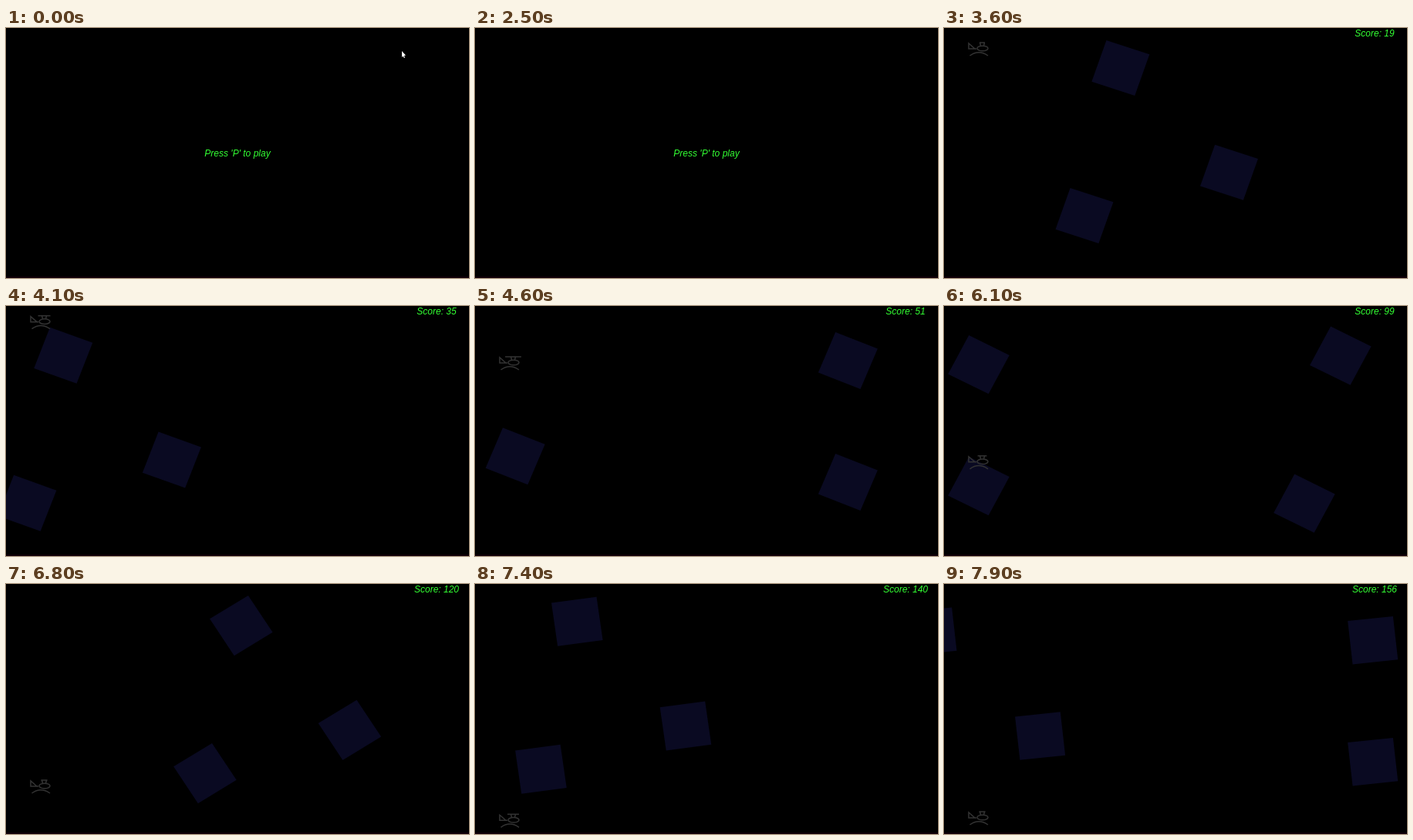
Write an HTML page with a canvas that moves like this. It is 600x325 px and loops after 8000 ms.

```html
<!DOCTYPE html>
<html lang="en">
<head>
<meta charset="utf-8">
<title>Helicopter game</title>
<style>
  html, body { margin: 0; width: 100%; height: 100%; overflow: hidden; background: #000; }
  canvas { display: block; }
</style>
</head>
<body>
<canvas id="stage" width="600" height="325"></canvas>
<script>
const ctx = document.getElementById('stage').getContext('2d');
const LOOP = 8000, STEP = 100, GAME_START = 3100;
const SX = 0.625, SY = 0.6;        // game units to stage pixels
const SPEED = 15, WAVE = 1665;     // units per tick, length of one obstacle pattern

// obstacle pivots: x in game units, y in stage pixels
const BLOCKS = [[562.5, 248], [637.5, 56], [862.5, 191.8], [1552.3, 67.5], [1552.3, 225.5]];

const TICKS = [[3000, 0], [3600, 19], [4600, 51], [5300, 74], [6800, 120], [7900, 156]];
const FLIGHT = [[3100, 42], [3600, 18], [3900, 0], [4000, 1], [4600, 65],
                [5300, 125], [6800, 254], [7450, 302], [7600, 302], [7900, 295]];

function at(keys, t) {
  if (t <= keys[0][0]) return keys[0][1];
  for (let i = 1; i < keys.length; i++) {
    const [t0, v0] = keys[i - 1], [t1, v1] = keys[i];
    if (t <= t1) return v0 + (v1 - v0) * (t - t0) / (t1 - t0);
  }
  return keys[keys.length - 1][1];
}

function label(text, x, y) {
  ctx.font = 'italic 12px "Liberation Sans", Arial, sans-serif';
  ctx.textAlign = 'center';
  ctx.fillStyle = '#3f3';
  ctx.fillText(text, x, y);
}

function line(...pts) {
  ctx.beginPath();
  pts.forEach(([x, y]) => ctx.lineTo(x, y));
  ctx.stroke();
}

function block(x, y, angle) {
  ctx.save();
  ctx.translate(x, y);
  ctx.scale(SX, SY);
  ctx.rotate(angle);
  ctx.fillStyle = '#0a0a22';
  ctx.fillRect(-58, -58, 94.5, 94.5);
  ctx.restore();
}

function helicopter(y, tick) {
  const spin = Math.abs(Math.sin((tick - 19) * Math.PI * 5 / 36));
  const half = 3.5 + 7 * spin;
  ctx.save();
  ctx.translate(0, y);
  ctx.strokeStyle = '#333';
  ctx.lineWidth = 1.5;
  line([42, 9], [32, 9], [32, 2], [40, 9]);
  ctx.beginPath();
  ctx.ellipse(50, 8.5, 7, 3.3, 0, 0, Math.PI * 2);
  ctx.stroke();
  line([47.5, 5], [46.5, 1]);
  line([51.5, 5], [52.5, 1]);
  line([49.5 - half, 1], [49.5 + half, 1]);
  ctx.beginPath();
  ctx.moveTo(33.5, 18);
  ctx.quadraticCurveTo(45, 9.5, 57, 18);
  ctx.stroke();
  ctx.restore();
}

function cursor(x, y) {
  const shape = [[0, 0], [0, 8], [1.7, 6.5], [2.8, 9], [4, 8.5], [2.9, 6], [5, 5.6]];
  ctx.beginPath();
  shape.forEach(([dx, dy]) => ctx.lineTo(x + dx, y + dy));
  ctx.fillStyle = '#fff';
  ctx.fill();
}

function title(t) {
  label("Press 'P' to play", 300, 166.5);
  if (t < 700) {
    const k = Math.max(0, t - 100) / 500;
    cursor(513 - 6 * k, 30 - 26 * k);
  }
}

function game(t) {
  const tick = Math.round(at(TICKS, t));
  for (let wave = 0; wave < 2; wave++) {
    for (const [x, y] of BLOCKS) {
      block((x + wave * WAVE - tick * SPEED) * SX, y, tick * 0.1);
    }
  }
  helicopter(at(FLIGHT, t), tick);
  label('Score: ' + tick, 558, 11);
}

function draw(now) {
  const t = Math.floor((now % LOOP) / STEP) * STEP;
  ctx.fillStyle = '#000';
  ctx.fillRect(0, 0, 600, 325);
  ctx.fillStyle = '#100008';
  ctx.fillRect(0, 323, 600, 2);
  if (t < GAME_START) title(t);
  else game(t);
}

const start = performance.now();
function loop() {
  draw(performance.now() - start);
  requestAnimationFrame(loop);
}
loop();
</script>
</body>
</html>
```
